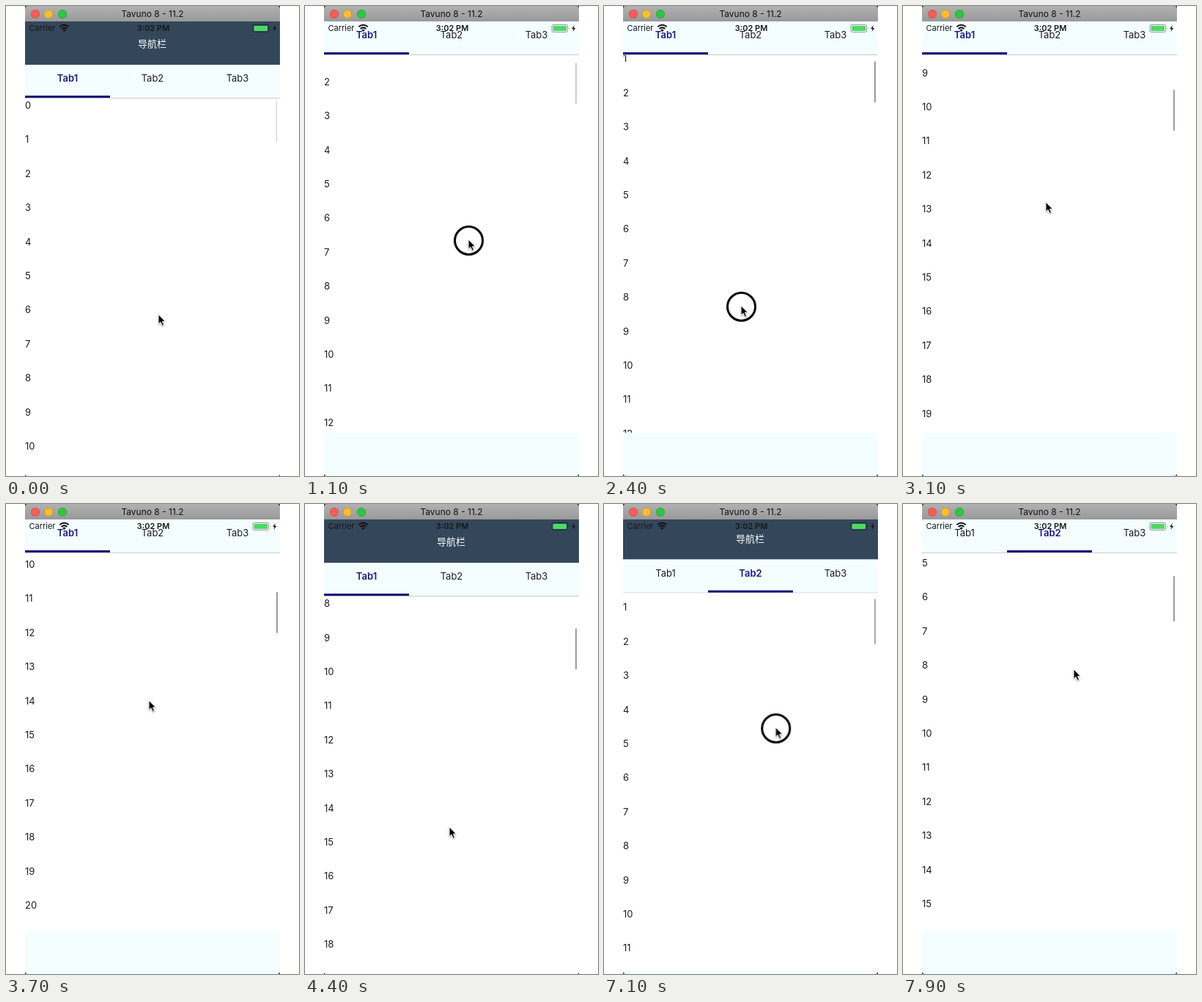
Recreate the animation shown at these times as an HTML page. Size 400 px wide and 640 px high, loop 8000 ms.

```html
<!DOCTYPE html>
<html lang="zh">
<head>
<meta charset="utf-8">
<title>Collapsing tab header</title>
<style>
@property --head { syntax: "<number>"; inherits: true; initial-value: 0; }
@property --tab { syntax: "<number>"; inherits: true; initial-value: 0; }
@property --scroll { syntax: "<number>"; inherits: true; initial-value: 0; }

html, body { margin: 0; width: 100%; height: 100%; overflow: hidden; background: #fff; }
body { font: 13px/18px Inter, "Noto Sans", sans-serif; color: #1c1c1c; }
div, svg { position: absolute; }

#stage {
  left: 0; top: 0; width: 400px; height: 640px; overflow: hidden;
  animation: head 8s linear infinite, tab 8s linear infinite;
}
#window { left: 26px; top: 0; width: 348px; height: 640px; background: #111; }
#titlebar {
  width: 348px; height: 21px; border-radius: 4px 4px 0 0;
  background: linear-gradient(#b1b1b1, #999);
  color: #111; font-size: 12px; line-height: 21px; text-align: center;
}
.light { top: 4.5px; width: 12px; height: 12px; border-radius: 50%; box-shadow: inset 0 0 0 .5px #0004; }

#screen {
  top: 21px; width: 348px; height: 619px; overflow: hidden;
  background: #f4fdff; border-radius: 0 0 4px 4px;
}
#app { width: 348px; height: 619px; transform: translateY(calc(var(--head) * -1px)); }
#nav { width: 348px; height: 59px; background: #34475a; color: #fff; text-align: center; }
#nav div { top: 21px; width: 347px; font-family: "Noto Sans CJK SC", "Noto Sans CJK", sans-serif; }

#tabs { top: 59px; width: 348px; height: 45px; background: #f4fdff; border-bottom: 1px solid #ccc; }
.tab { top: 9px; width: 116px; text-align: center; }
.tab:nth-child(1) { animation: first 8s step-end infinite; }
.tab:nth-child(2) { animation: second 8s step-end infinite; }
#line {
  top: 41.5px; width: 116px; height: 3.5px; background: #1a1478;
  transform: translateX(calc(var(--tab) * 116px));
}

#view { top: 105px; width: 348px; height: 514px; overflow: hidden; background: #fff; }
#pages { transform: translateX(calc(var(--tab) * -348px)); }
.page { width: 348px; height: 514px; overflow: hidden; background: #fff; }
.page + .page { left: 348px; }
#page1 { --ratio: .109; animation: scroll1 8s linear infinite; }
#page2 { --ratio: .123; animation: scroll2 8s linear infinite; }
.list { transform: translateY(calc(var(--scroll) * -1px)); }
.bar {
  left: 342.5px; top: 3px; width: 2.3px; height: 56px; border-radius: 1.5px; background: #9a9a9a;
  transform: translateY(calc(var(--scroll) * var(--ratio) * 1px));
}
#page1 .bar { animation: bar1 8s linear infinite; }
#page2 .bar { height: 62px; animation: bar2 8s linear infinite; }

#status { top: 21px; width: 348px; height: 20px; font-size: 11px; color: #161616; white-space: nowrap; }
#clock { width: 350px; text-align: center; font-weight: 600; }
#pointer { left: 0; top: 0; animation: move 8s linear infinite; }
#ring {
  left: -20px; top: -19px; width: 35px; height: 35px; border: 3px solid #000; border-radius: 50%;
  animation: press 8s step-end infinite;
}
#arrow { left: -2px; top: -2px; filter: drop-shadow(0 1px 1px #0005); }

@keyframes head {
  0%, 8.75% { --head: 0; }
  12.5%, 20% { --head: 59; }
  23.75%, 26.5% { --head: 0; }
  29.5%, 50% { --head: 59; }
  53.5%, 88.5% { --head: 0; }
  92%, 100% { --head: 59; }
}
@keyframes tab {
  0%, 80% { --tab: 0; animation-timing-function: ease-out; }
  84%, 100% { --tab: 1; }
}
@keyframes first {
  0% { color: #1c1880; font-weight: 600; }
  82%, 100% { color: #1c1c1c; font-weight: 400; }
}
@keyframes second {
  0% { color: #1c1c1c; font-weight: 400; }
  82%, 100% { color: #1c1880; font-weight: 600; }
}
@keyframes scroll1 {
  0%, 7.5% { --scroll: 0; }
  13.75% { --scroll: 66; }
  16.25% { --scroll: 95; animation-timing-function: ease-out; }
  18.75%, 19.5% { --scroll: 130; }
  24%, 26.5% { --scroll: 0; }
  30% { --scroll: 50.4; }
  32.5% { --scroll: 160; animation-timing-function: cubic-bezier(.25, .6, .4, 1); }
  46.25%, 49% { --scroll: 458; }
  54% { --scroll: 375; }
  55% { --scroll: 371; animation-timing-function: ease-out; }
  60%, 62.5% { --scroll: 350; }
  66.5% { --scroll: 215; animation-timing-function: ease-out; }
  72%, 100% { --scroll: 158.6; }
}
@keyframes scroll2 {
  0%, 87.5% { --scroll: 0; }
  92% { --scroll: 130; animation-timing-function: ease-out; }
  98.75%, 100% { --scroll: 228; }
}
@keyframes bar1 {
  0% { opacity: .5; width: 1px; }
  3.75%, 7.5% { opacity: 0; width: 1px; }
  13.75% { opacity: .5; width: 2.5px; }
  16%, 70% { opacity: 1; width: 2.3px; }
  73.75% { opacity: .5; width: 1px; }
  76%, 100% { opacity: 0; width: 1px; }
}
@keyframes bar2 {
  0%, 87.5% { opacity: 0; }
  89%, 100% { opacity: 1; }
}
@keyframes move {
  0% { transform: translate(208px, 420px); }
  7.5% { transform: translate(220px, 386px); }
  13.75% { transform: translate(223px, 318px); }
  16.25% { transform: translate(224px, 289px); }
  19.5% { transform: translate(215px, 300px); }
  24% { transform: translate(200px, 430px); }
  26.5% { transform: translate(189px, 459px); }
  30% { transform: translate(187px, 408.5px); }
  32.5% { transform: translate(190px, 298px); }
  36%, 46.25% { transform: translate(195px, 267px); }
  49% { transform: translate(196px, 350px); }
  54% { transform: translate(197px, 437px); }
  55% { transform: translate(197px, 440px); }
  62.5% { transform: translate(193px, 290px); }
  66.5% { transform: translate(190px, 425px); }
  69%, 73.75% { transform: translate(190px, 416px); }
  78.5%, 82% { transform: translate(200px, 98px); }
  87.5% { transform: translate(234px, 340px); }
  92% { transform: translate(235px, 212px); }
  95%, 100% { transform: translate(233px, 225px); }
}
@keyframes press {
  0%, 16.25%, 24%, 32.5%, 54%, 66.5%, 80.2%, 92%, 100% { opacity: 0; }
  7.5%, 19.5%, 26.5%, 49%, 62.5%, 78.8%, 87.5% { opacity: 1; }
}
</style>
</head>
<body>
<div id="stage">
  <div id="window">
    <div id="titlebar">Tavuno 8 - 11.2
      <div class="light" style="left:7.5px;background:#fc5b57"></div>
      <div class="light" style="left:26px;background:#fdbd2e"></div>
      <div class="light" style="left:45px;background:#2bc840"></div>
    </div>
    <div id="screen">
      <div id="app">
        <div id="nav"><div>导航栏</div></div>
        <div id="tabs">
          <div class="tab">Tab1</div>
          <div class="tab" style="left:116px">Tab2</div>
          <div class="tab" style="left:232px">Tab3</div>
          <div id="line"></div>
        </div>
        <div id="view">
          <div id="pages">
            <div class="page" id="page1"><div class="list"></div><div class="bar"></div></div>
            <div class="page" id="page2"><div class="list"></div><div class="bar"></div></div>
          </div>
        </div>
      </div>
    </div>
    <div id="status">
      <div style="left:5.5px">Carrier</div>
      <div id="clock">3:02 PM</div>
      <svg width="348" height="20">
        <g fill="none" stroke="#111" stroke-width="2">
          <path d="M47.3 7.3Q53.5 2.3 59.7 7.3M49.6 10Q53.5 6.8 57.4 10"/>
        </g>
        <path d="M51.2 11.6Q53.5 9.8 55.8 11.6L53.5 14.2Z" fill="#111"/>
        <rect x="311" y="4.5" width="21.5" height="10" rx="2" fill="none" stroke="#0006"/>
        <rect x="312.5" y="6" width="18.5" height="7" rx="1" fill="#4cd964"/>
        <path d="M334 7.7q1.6 1.8 0 3.6z" fill="#0006"/>
        <path d="M341.8 5l-3.6 5h2.3l-1 4 3.8-5h-2.4z" fill="#111"/>
      </svg>
    </div>
  </div>
  <div id="pointer">
    <div id="ring"></div>
    <svg id="arrow" width="14" height="22">
      <path d="M2 2v13.2l3-2.8 2.3 5 2.3-1-2.2-4.8h4z" fill="#000" stroke="#fff"/>
    </svg>
  </div>
</div>
<script>
const ROW_HEIGHT = 46.4;
for (const list of document.querySelectorAll(".list")) {
  for (let i = 0; i < 30; i++) {
    const row = document.createElement("div");
    row.textContent = i;
    row.style.top = i * ROW_HEIGHT + "px";
    list.append(row);
  }
}
</script>
</body>
</html>
```
